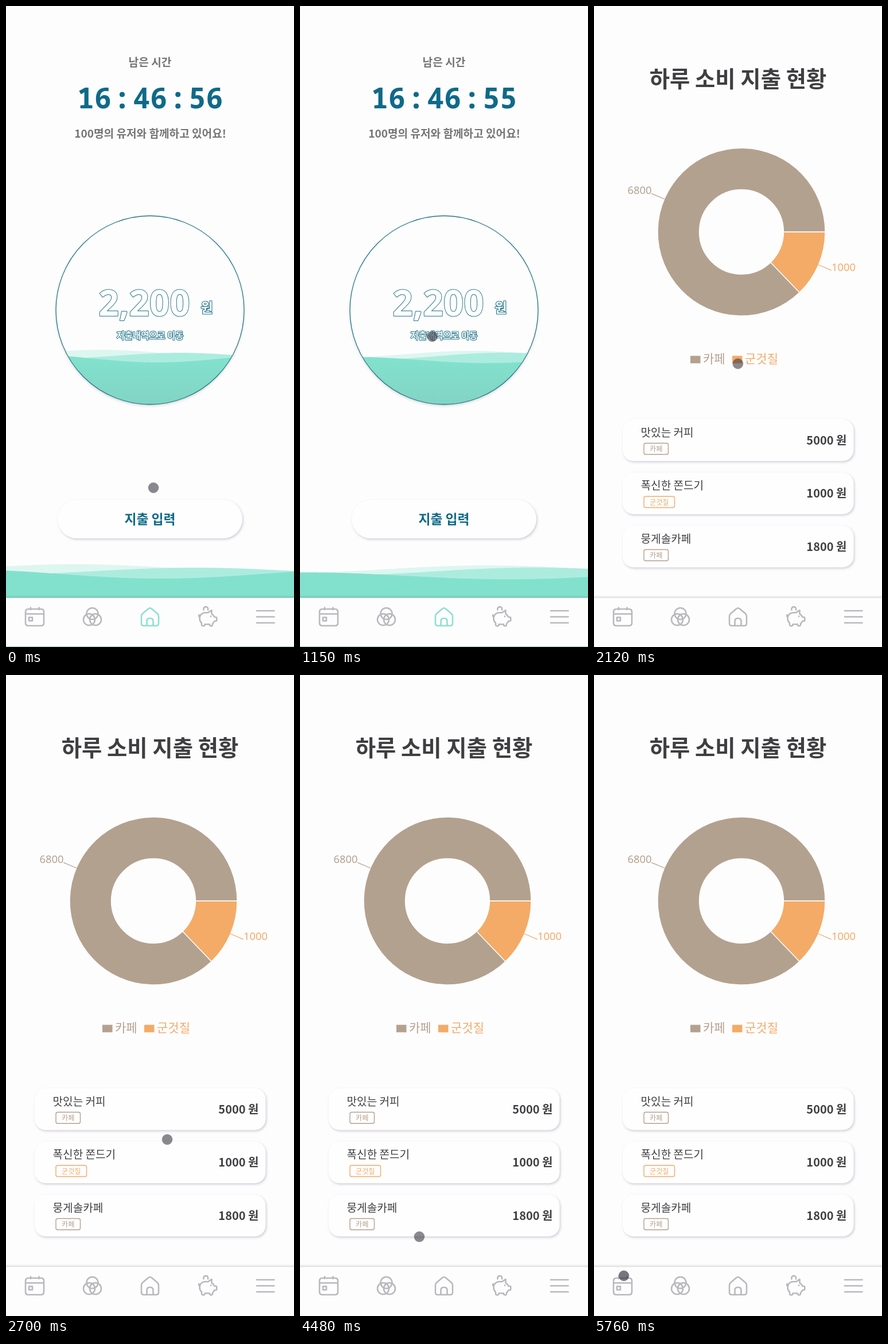
These frames come from a looping animation (502x1115 px, 5.85 s). An HTML page with a canvas:

```html
<!DOCTYPE html>
<html lang="ko">
<head>
<meta charset="utf-8">
<title>하루 소비</title>
<style>
html, body { margin: 0; width: 100%; height: 100%; overflow: hidden; background: #fefdfe; }
canvas { display: block; width: 502px; height: 1115px; }
</style>
</head>
<body>
<canvas id="stage"></canvas>
<script>
const W = 502, H = 1115, LOOP = 5850, SWITCH = 1820;
const KOREAN = '"Noto Sans CJK KR", "Noto Sans KR", "Noto Sans CJK", "Noto Sans", sans-serif';
const LATIN = '"Noto Sans", "Open Sans", sans-serif';
const MONO = '"Noto Sans Mono", "DejaVu Sans Mono", monospace';
const BG = '#fefdfe', TEAL = '#0e6a88', RIM = '#25798a', MINT = '#82e1cc', GREY = '#b9b9bd';
const BEIGE = '#b3a18f', ORANGE = '#f3ab67', INK = '#3f3f42';
const canvas = document.getElementById('stage');
const c = canvas.getContext('2d');
const dpr = window.devicePixelRatio || 1;
canvas.width = W * dpr;
canvas.height = H * dpr;

// Rows of [time, x, y]
const pointerPath = [
  [60, 257, 838], [350, 243, 705], [640, 229, 580], [1240, 231, 574], [1610, 235, 571],
  [1820, 235, 571], [2390, 265, 668], [2700, 281, 807], [2870, 287, 965], [3030, 273, 925],
  [3320, 246, 772], [3610, 227, 661], [3760, 227, 661], [4050, 237, 730], [4330, 245, 862],
  [4480, 208, 977], [4900, 196, 1012], [5250, 148, 1072], [5550, 72, 1061], [5760, 52, 1045]
];
// Rows of [time, crest x, mean y, amplitude]
const WAVELENGTH = 700;
const waveLayers = [
  { color: '#def6f0', keys: [[0, 120, 978, 7], [640, 218, 979, 7], [1610, 425, 980, 6]] },
  { color: '#acecdf', keys: [[0, 330, 983, 6], [640, 352, 983.5, 6.5], [1610, 460, 983.5, 7]] },
  { color: MINT, keys: [[0, -80, 988, 8], [640, -40, 990.5, 6], [1610, 60, 992, 6]] }
];

// Linear between keys, continuing the last slope when asked
function sample(keys, t, extend) {
  const last = keys.length - 1;
  if (t <= keys[0][0]) return keys[0].slice(1);
  if (t >= keys[last][0] && !extend) return keys[last].slice(1);
  let i = 1;
  while (i < last && t > keys[i][0]) i++;
  const a = keys[i - 1], b = keys[i], u = (t - a[0]) / (b[0] - a[0]);
  return a.slice(1).map((v, k) => v + (b[k + 1] - v) * u);
}

function text(str, x, cy, size, color, { weight = 400, align = 'left', outline = 0, font = KOREAN } = {}) {
  const y = cy + size * (font === KOREAN ? 0.37 : 0.357);
  c.font = `${weight} ${size}px ${font}`;
  c.textAlign = align;
  if (outline) {
    c.strokeStyle = RIM;
    c.lineWidth = outline;
    c.lineJoin = 'round';
    c.strokeText(str, x, y);
  }
  c.fillStyle = color;
  c.fillText(str, x, y);
}

function withShadow(color, blur, dx, dy, draw) {
  c.save();
  c.shadowColor = color;
  c.shadowBlur = blur * dpr;
  c.shadowOffsetX = dx * dpr;
  c.shadowOffsetY = dy * dpr;
  draw();
  c.restore();
}

function box(x, y, w, h, r) {
  c.beginPath();
  c.roundRect(x, y, w, h, r);
}

function card(x, y, w, h, r) {
  withShadow('rgba(60,50,80,.24)', 4, 1.5, 2, () => {
    box(x, y, w, h, r);
    c.fillStyle = '#fffeff';
    c.fill();
  });
}

function disc(x, y, r) {
  c.beginPath();
  c.arc(x, y, r, 0, Math.PI * 2);
}

// mapY turns a footer-wave height into the local one
function waves(t, left, width, bottom, mapY, frontFill) {
  waveLayers.forEach((layer, i) => {
    const [crest, mean, amp] = sample(layer.keys, t, true);
    c.beginPath();
    c.moveTo(left, bottom);
    for (let x = 0; x <= W; x += 2) {
      const y = mean - amp * Math.cos((x - crest) / WAVELENGTH * Math.PI * 2);
      c.lineTo(left + x / W * width, mapY(y));
    }
    c.lineTo(left + width, bottom);
    c.fillStyle = i === 2 ? frontFill : layer.color;
    c.fill();
  });
}

function home(t) {
  const bold = { weight: 700, align: 'center' };
  const seconds = t < 440 ? 56 : t < 1440 ? 55 : 54;
  text('남은 시간', 251, 98, 19.2, '#757575', bold);
  ['16', ':', '46', ':', String(seconds)].forEach((part, i) => {
    text(part, 154 + i * 48.6, 160, 50, TEAL, { ...bold, font: MONO });
  });
  text('100명의 유저와 함께하고 있어요!', 251.5, 222, 19.1, '#757575', bold);

  withShadow('rgba(40,60,60,.25)', 5, 0, 2.5, () => {
    disc(251, 529, 163.5);
    c.fillStyle = BG;
    c.fill();
  });
  c.save();
  disc(251, 529, 164);
  c.clip();
  const fade = c.createLinearGradient(0, 615, 0, 693);
  fade.addColorStop(0, MINT);
  fade.addColorStop(1, '#82d4c5');
  waves(t, 87, 328, 695, y => 598 + (y - 971) * 0.88, fade);
  c.restore();
  disc(251, 529, 164);
  c.strokeStyle = RIM;
  c.lineWidth = 1.3;
  c.stroke();

  text('2,200', 241, 516.5, 62, '#fffeff', { ...bold, outline: 2, font: LATIN });
  text('원', 350, 524, 23, '#fffeff', { ...bold, outline: 2.2 });
  text('지출내역으로 이동', 251, 573, 15.4, '#fffeff', { ...bold, outline: 2 });

  card(90, 859, 322, 67, 33.5);
  text('지출 입력', 251, 893, 22.8, TEAL, bold);
  waves(t, 0, W, 1032, y => y, MINT);
}

function slice(from, to, color) {
  c.beginPath();
  c.arc(257, 393, 146, from, to);
  c.arc(257, 393, 73.5, to, from, true);
  c.closePath();
  c.fillStyle = color;
  c.fill();
  c.strokeStyle = '#fff';
  c.lineWidth = 1.3;
  c.stroke();
}

function leader(angle, color) {
  const dx = Math.cos(angle), dy = Math.sin(angle);
  c.beginPath();
  c.moveTo(257 + 146 * dx, 393 + 146 * dy);
  c.lineTo(257 + 170 * dx, 393 + 170 * dy);
  c.strokeStyle = color;
  c.lineWidth = 1.2;
  c.stroke();
}

function entry(y, name, tag, tagWidth, color, price) {
  card(50, y, 402.5, 72.5, 19);
  text(name, 81.5, y + 22.5, 19.1, INK);
  box(87, y + 41.5, tagWidth, 19.5, 3);
  c.strokeStyle = color;
  c.lineWidth = 1.4;
  c.stroke();
  text(tag, 87 + tagWidth / 2, y + 51.5, 12.2, color, { align: 'center' });
  text(price + ' 원', 440.5, y + 36.5, 20, INK, { weight: 700, align: 'right' });
}

function report() {
  text('하루 소비 지출 현황', 251, 127, 38.4, INK, { weight: 700, align: 'center' });
  const split = 1000 / 7800 * Math.PI * 2;
  slice(split, Math.PI * 2, BEIGE);
  slice(0, split, ORANGE);
  leader(split / 2 + Math.PI, BEIGE);
  leader(split / 2, ORANGE);
  text('6800', 100.5, 320, 18.4, BEIGE, { align: 'right', font: LATIN });
  text('1000', 414, 454, 18.4, ORANGE, { font: LATIN });
  [[168, '카페', BEIGE], [241, '군것질', ORANGE]].forEach(([x, label, color]) => {
    c.fillStyle = color;
    c.fillRect(x, 608.5, 17.5, 13);
    text(label, x + 22, 613, 21, color);
  });
  entry(719, '맛있는 커피', '카페', 42.5, BEIGE, 5000);
  entry(811.5, '폭신한 쫀드기', '군것질', 53.5, ORANGE, 1000);
  entry(904, '뭉게솔카페', '카페', 42.5, BEIGE, 1800);
}

const houseIcon = new Path2D(
  'M236 1061 Q236 1059 238 1057 L248 1048.5 Q251 1046 254 1048.5 L264 1057 Q266 1059 266 1061' +
  ' V1074 Q266 1078 262 1078 H240 Q236 1078 236 1074 Z' +
  ' M245.5 1078 V1070 Q245.5 1065 251 1065 Q256.5 1065 256.5 1070 V1078');
const calendarIcon = new Path2D(
  'M39 1049 H61 Q66 1049 66 1054 V1073 Q66 1078 61 1078 H39 Q34 1078 34 1073 V1054 Q34 1049 39 1049 Z' +
  ' M34 1057.5 H66 M43 1046.5 V1050 M57.5 1046.5 V1050 M40 1063.5 H46 V1069.5 H40 Z');
const pigIcon = new Path2D(
  'M358.5 1051 V1057.3 Q362 1059.5 363.3 1063 H365.5 Q367.3 1063 367.3 1065 V1068 Q367.3 1070 365.5 1070' +
  ' H363.3 Q362 1073 360 1074.5 V1076 Q360 1078.5 357.4 1078.5 Q355 1078.5 355 1076 V1075.5' +
  ' H346.5 V1076 Q346.5 1078.5 344 1078.5 Q341 1078.5 341 1076 V1073.5 Q337.5 1070 337.5 1065.5' +
  ' Q338 1056 347 1055.3 H352 Z M337.5 1063 Q335.5 1061 336.5 1059' +
  ' M344.5 1050.5 A4 4 0 1 1 352 1050.5 M357 1061.6 V1062');

function nav(active) {
  withShadow('rgba(0,0,0,.3)', 5, 0, -1, () => {
    c.fillStyle = BG;
    c.fillRect(-10, 1029.5, W + 20, H);
  });
  c.strokeStyle = GREY;
  c.lineWidth = 2.6;
  c.lineCap = c.lineJoin = 'round';
  c.stroke(calendarIcon);
  [[150.5, 1057], [145, 1067.3], [156, 1067.3]].forEach(([x, y]) => {
    disc(x, y, 10);
    c.stroke();
  });
  c.stroke(pigIcon);
  [1052, 1062.5, 1073].forEach(y => {
    c.beginPath();
    c.moveTo(437, y);
    c.lineTo(467.5, y);
    c.stroke();
  });
  c.strokeStyle = active ? '#8de1cc' : GREY;
  c.stroke(houseIcon);
  if (active) {
    c.fillStyle = '#a5d8cd';
    c.fillRect(0, 1113.8, W, 1.2);
  }
}

function pointer(t) {
  const [x, y] = sample(pointerPath, t);
  const pressed = (t > 1560 && t < SWITCH) || t > 5730;
  disc(x, y, 9);
  c.fillStyle = `rgba(50,48,56,${pressed ? 0.66 : 0.57})`;
  c.fill();
  c.strokeStyle = 'rgba(110,108,116,.4)';
  c.lineWidth = 1;
  c.stroke();
}

function render(t) {
  c.setTransform(dpr, 0, 0, dpr, 0, 0);
  c.fillStyle = BG;
  c.fillRect(0, 0, W, H);
  const onHome = t < SWITCH;
  if (onHome) home(t);
  else report();
  nav(onHome);
  pointer(t);
}

const start = performance.now();
function tick() {
  render((performance.now() - start) % LOOP);
  requestAnimationFrame(tick);
}
tick();
</script>
</body>
</html>
```
